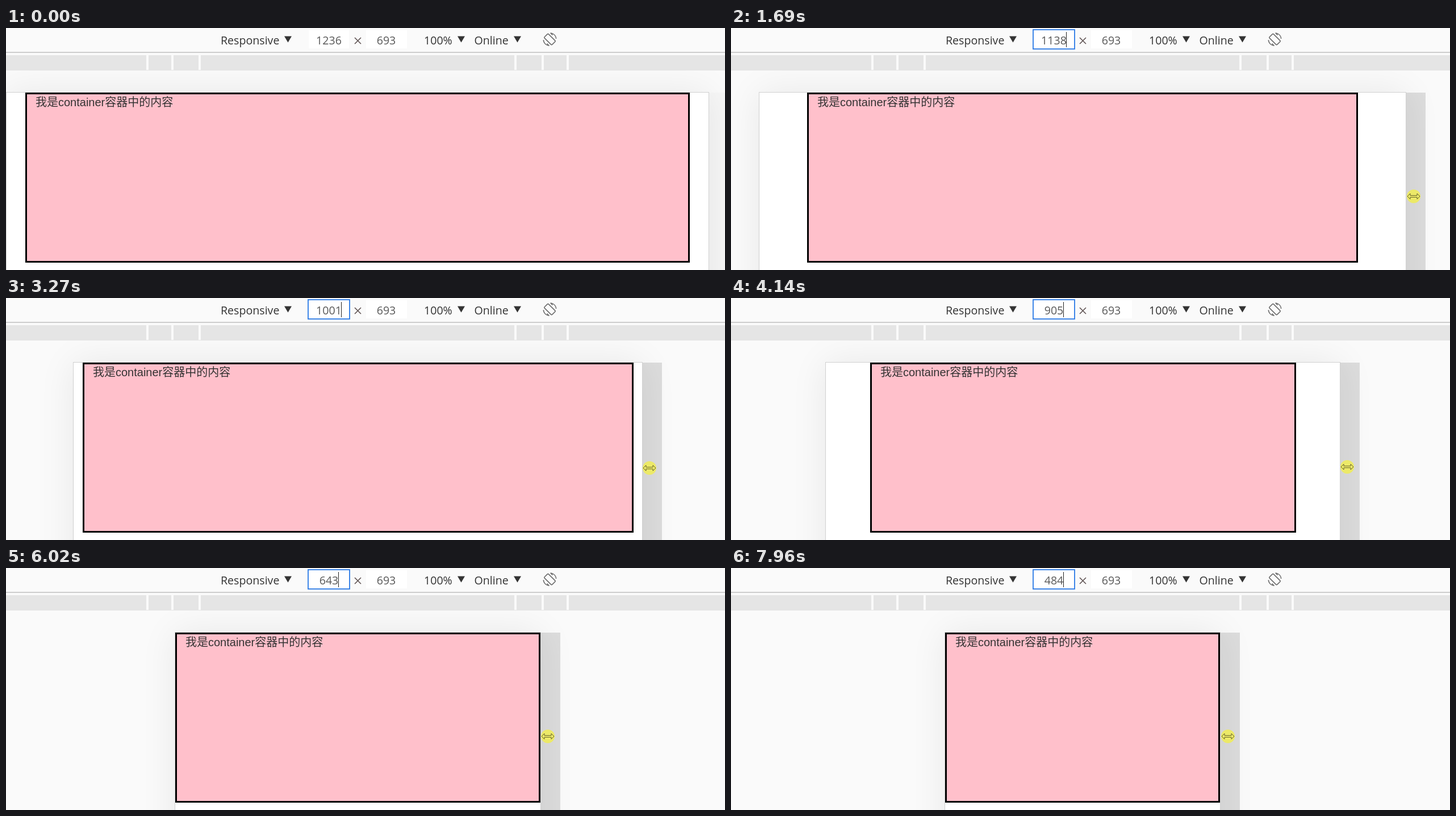
Animation of 1266x427 px, one loop 8 s. Source, as an HTML page with a canvas:

```html
<!DOCTYPE html>
<html lang="zh">
<head>
<meta charset="utf-8">
<title>Responsive container</title>
<style>
html, body { margin: 0; width: 100%; height: 100%; overflow: hidden; background: #fafafa; }
canvas { display: block; }
</style>
</head>
<body>
<canvas id="stage" width="1266" height="427"></canvas>
<script>
const ctx = document.getElementById('stage').getContext('2d');
const LOOP = 8000, TICK = 65; // the screen updates once per tick
const DRAG_START = 14, ENTRY_END = 12;
const MID = 619, TOP = 114, HANDLE = 35, GRIP = 14;
const UI = '19.6px "Open Sans", "Noto Sans", sans-serif';
const BODY = '300 20px "Liberation Sans", "Noto Sans CJK SC", "Noto Sans CJK", sans-serif';

// Where the drag changes pace: [tick, viewport width]
const pace = [
  [13, 1236], [26, 1138], [29, 1110], [33, 1110], [45, 1048], [58, 926],
  [70, 876], [82, 736], [103, 540], [110, 480], [119, 470], [122, 484]
];

const mix = (a, b, p) => a + (b - a) * Math.min(1, Math.max(0, p));

function viewportWidth(tick) {
  let next = pace.findIndex(([t]) => t >= tick);
  if (next < 0) next = pace.length - 1;
  const [t1, to] = pace[next];
  const [t0, from] = pace[Math.max(0, next - 1)];
  return t1 === t0 ? to : Math.round(mix(from, to, (tick - t0) / (t1 - t0)));
}

function cursorPoint(tick, width) {
  const entry = tick / ENTRY_END;
  const sway = 3 * Math.cos((tick - DRAG_START + 1) / 30 * Math.PI * 2);
  return {
    x: Math.floor(MID + width / 2 + GRIP + mix(-50, 0, entry)),
    y: Math.round(tick < DRAG_START ? mix(411, 302, entry) : 299.5 + sway)
  };
}

function containerWidth(pageWidth) {
  if (pageWidth >= 1200) return 1170;
  if (pageWidth >= 992) return 970;
  return pageWidth >= 768 ? 750 : pageWidth;
}

function rect(x, y, w, h, color) {
  ctx.fillStyle = color;
  ctx.fillRect(x, y, w, h);
}

function text(str, x, y, font, color, align = 'left') {
  ctx.font = font;
  ctx.fillStyle = color;
  ctx.textAlign = align;
  ctx.fillText(str, x, y);
}

function poly(...points) {
  ctx.beginPath();
  points.forEach(([x, y]) => ctx.lineTo(x, y));
  ctx.closePath();
}

function menu(label, x, arrowX) {
  text(label, x, 29, UI, '#333');
  poly([arrowX, 14.5], [arrowX + 13, 14.5], [arrowX + 6.5, 25.5]);
  ctx.fill();
}

function rotateIcon() {
  ctx.save();
  ctx.translate(957.5, 20);
  ctx.strokeStyle = '#6e6e6e';
  ctx.lineWidth = 1.7;
  for (let half = 0; half < 2; half++) {
    ctx.rotate(Math.PI);
    ctx.beginPath();
    ctx.arc(0, 0, 11.3, -1.35, -0.1);
    ctx.moveTo(1, -11.5);
    ctx.lineTo(5, -7.5);
    ctx.stroke();
  }
  ctx.rotate(-Math.PI / 4);
  ctx.beginPath();
  ctx.roundRect(-5, -9.5, 10, 19, 1.5);
  ctx.stroke();
  ctx.restore();
}

function toolbar(width, dragging) {
  rect(0, 0, 1266, 75, '#fafafa');
  rect(0, 42, 1266, 2, '#cdcdcd');
  rect(0, 48, 1266, 27, '#e5e5e5');
  for (const offset of [276, 324, 368]) {
    rect(MID + offset, 48, 4, 26, '#fafafa');
    rect(MID - offset - 4, 48, 4, 26, '#fafafa');
  }

  menu('Responsive', 378, 490);
  menu('100%', 736, 795);
  menu('Online', 824.5, 894);
  rotateIcon();

  rect(533, 4, 71, 32, '#fff');
  rect(634, 4, 72, 32, '#fff');
  text('693', 669.5, 29, UI, '#5a5a5a', 'center');
  text(width, 568.5, 29, UI, '#5a5a5a', 'center');
  if (dragging) {
    const caret = Math.round(568 + ctx.measureText(width).width / 2);
    rect(caret, 7, 1, 27, '#222');
    ctx.strokeStyle = '#2a79e6';
    ctx.lineWidth = 1.8;
    ctx.strokeRect(532, 3, 73, 34);
  }

  ctx.strokeStyle = '#5f5353';
  ctx.lineWidth = 1.6;
  ctx.beginPath();
  for (const side of [-5.5, 5.5]) {
    ctx.moveTo(619.5 - side, 17);
    ctx.lineTo(619.5 + side, 28);
  }
  ctx.stroke();
}

function page(width, dragging) {
  const left = Math.round(MID - width / 2), right = left + width;
  ctx.save();
  ctx.shadowColor = 'rgba(0,0,0,0.08)';
  ctx.shadowBlur = 60;
  rect(left, TOP, width, 700, '#fff');
  ctx.restore();

  rect(right, TOP, HANDLE, 313, `rgba(0,0,0,${dragging ? 0.12 : 0.015})`);
  ctx.strokeStyle = '#d0d0d0';
  ctx.lineWidth = 1;
  ctx.strokeRect(left - 0.5, TOP - 0.5, width + 1, 700);

  const boxWidth = containerWidth(width);
  const x = Math.round(left + (width - boxWidth) / 2);
  rect(x, TOP, boxWidth, 300, '#000');
  rect(x + 3, TOP + 3, boxWidth - 6, 294, '#ffc0cb');
  text('我是container容器中的内容', x + 18, 138, BODY, '#333');
}

function cursor({ x, y }, resizing) {
  ctx.save();
  ctx.translate(x, y);
  ctx.fillStyle = '#ece968';
  ctx.beginPath();
  ctx.arc(0, 0, 12, 0, Math.PI * 2);
  ctx.fill();
  ctx.lineWidth = 1;
  if (resizing) {
    poly([-11, 0], [-6, -5], [-6, -1.5], [6, -1.5], [6, -5], [11, 0],
         [6, 5], [6, 1.5], [-6, 1.5], [-6, 5]);
    ctx.strokeStyle = '#66632a';
  } else {
    poly([0, 0], [0, 16], [4, 12.5], [6.5, 18], [9, 17], [6.5, 11.5], [11.5, 11.5]);
    ctx.fillStyle = '#fff';
    ctx.fill();
    ctx.strokeStyle = '#222';
  }
  ctx.stroke();
  ctx.restore();
}

function draw(time) {
  const tick = Math.floor(time / TICK);
  const dragging = tick >= DRAG_START;
  const width = viewportWidth(tick);

  rect(0, 0, 1266, 427, '#fafafa');
  page(width, dragging);
  toolbar(width, dragging);
  if (tick > 0) {
    const point = cursorPoint(tick, width);
    cursor(point, point.x >= MID + width / 2);
  }
}

const origin = performance.now();
function frame() {
  draw((performance.now() - origin) % LOOP);
  requestAnimationFrame(frame);
}
frame();
</script>
</body>
</html>
```
